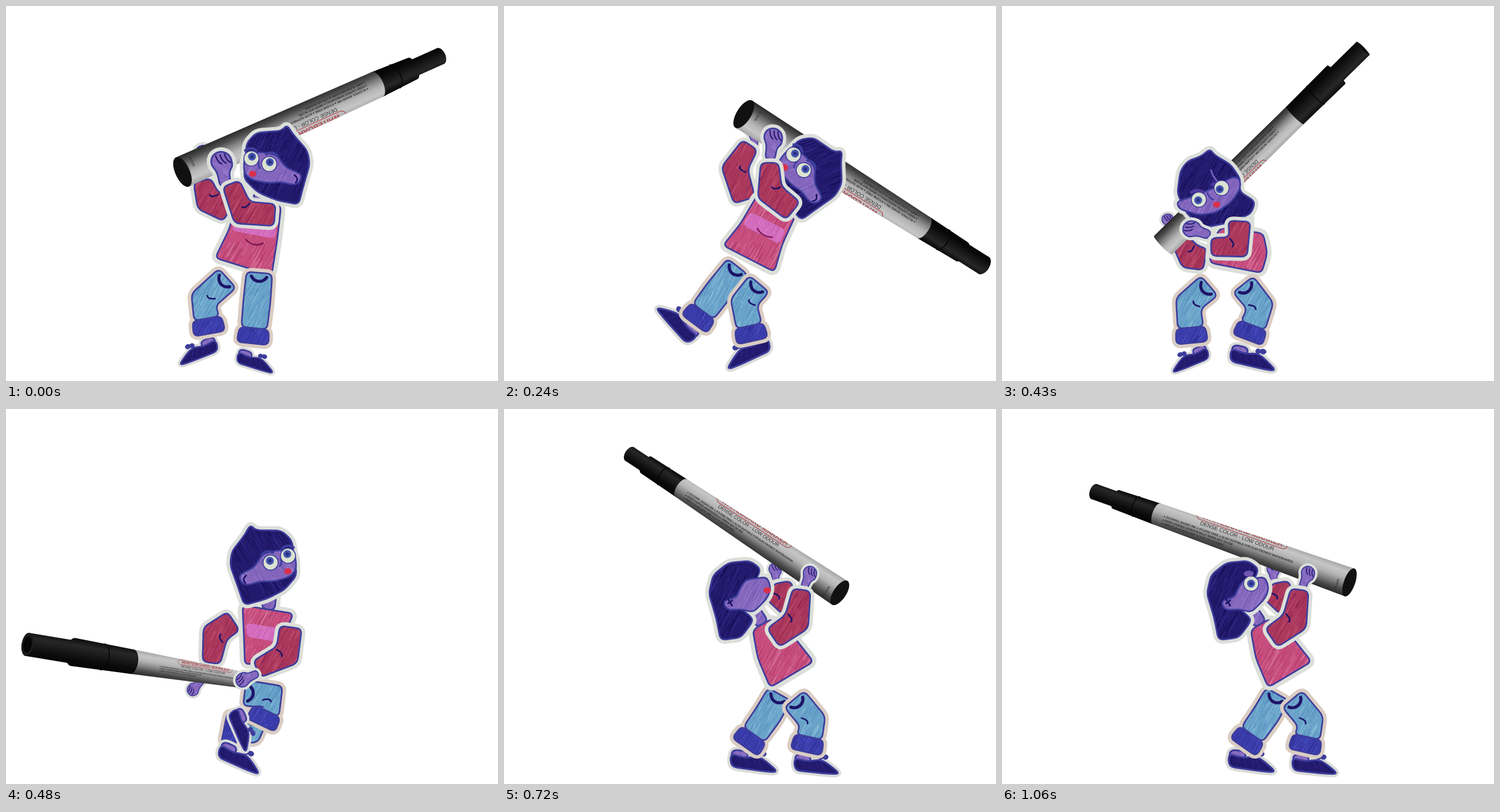
An HTML page with a canvas for the animation above (1.2 s loop, 800 by 610 pixels).

```html
<!DOCTYPE html>
<html lang="en">
<head>
<meta charset="utf-8">
<title>Paper puppet swinging a marker</title>
<style>
html, body { margin: 0; width: 100%; height: 100%; overflow: hidden; background: #fff; }
canvas { display: block; }
</style>
</head>
<body>
<canvas id="stage" width="800" height="610"></canvas>
<script>
const ctx = document.getElementById('stage').getContext('2d');
const WHITE = '#dcdfd9', BEIGE = '#dacdc3', BLUE = '#3d3d9c', NAVY = '#1d1468';

let seed = 7;
const rnd = () => (seed = seed * 16807 % 2147483647) / 2147483647;

// A tile of slanted pencil strokes
function pencil(base, light, dark) {
  const tile = document.createElement('canvas'), size = tile.width = tile.height = 128;
  const c = tile.getContext('2d');
  c.fillStyle = base;
  c.fillRect(0, 0, size, size);
  c.globalAlpha = 0.4;
  c.lineWidth = 1.4;
  for (let i = 0; i < 260; i++) {
    const x = rnd() * size, y = rnd() * size, len = 10 + rnd() * 25;
    c.strokeStyle = rnd() < 0.5 ? light : dark;
    c.beginPath();
    c.moveTo(x, y);
    c.lineTo(x + len * 0.55, y - len);
    c.stroke();
  }
  return ctx.createPattern(tile, 'repeat');
}
const FILL = {
  arm: pencil('#aa385c', '#d0607f', '#8a244e'),
  sweater: pencil('#c74e7f', '#e38fae', '#ac3763'),
  chest: pencil('#d46cbd', '#ec92d8', '#bb5aa8'),
  jeans: pencil('#6aa3ca', '#9accdf', '#4c86b8'),
  cuff: pencil('#3b3cac', '#5962cf', '#29267f'),
  hair: pencil('#221a6c', '#3d3296', '#110a4c'),
  skin: pencil('#8568bd', '#a78adb', '#6c50ad')
};
const nums = s => s.split(' ').map(Number);

// Closed path with softened corners
function outline(n) {
  const p = new Path2D(), pts = [];
  for (let i = 0; i < n.length; i += 2) pts.push([n[i], n[i + 1]]);
  const toward = (a, b) => {
    const d = Math.hypot(b[0] - a[0], b[1] - a[1]), k = Math.min(9, d / 2) / (d || 1);
    return [a[0] + (b[0] - a[0]) * k, a[1] + (b[1] - a[1]) * k];
  };
  pts.forEach((c, i) => {
    p.lineTo(...toward(c, pts.at(i - 1)));
    p.quadraticCurveTo(...c, ...toward(c, pts[(i + 1) % pts.length]));
  });
  p.closePath();
  return p;
}

// Outline of a chain of joints x, y, width
function chain(n) {
  const count = n.length / 3, left = [], right = [];
  for (let i = 0; i < count; i++) {
    const a = 3 * Math.max(0, i - 1), b = 3 * Math.min(count - 1, i + 1);
    const [x, y, w] = n.slice(3 * i);
    const dir = Math.atan2(n[b + 1] - n[a + 1], n[b] - n[a]);
    const nx = -Math.sin(dir) * w / 2, ny = Math.cos(dir) * w / 2;
    left.push(x + nx, y + ny);
    right.unshift(x - nx, y - ny);
  }
  return [...left, ...right];
}

// A paper cut-out: [fill, points] parts on one backing
function card(paper, margin, ...parts) {
  const shapes = parts.map(([fill, n]) => [FILL[fill], outline(n)]);
  ctx.lineJoin = ctx.lineCap = 'round';
  ctx.fillStyle = ctx.strokeStyle = paper;
  ctx.lineWidth = margin * 2;
  for (const [, path] of shapes) { ctx.fill(path); ctx.stroke(path); }
  ctx.strokeStyle = BLUE;
  ctx.lineWidth = 2.6;
  for (const [fill, path] of shapes) {
    ctx.fillStyle = fill;
    ctx.fill(path);
    ctx.stroke(path);
  }
}

function line(points, color = NAVY, width = 2.5) {
  const [x, y, ...rest] = nums(points);
  ctx.beginPath();
  ctx.moveTo(x, y);
  ctx.quadraticCurveTo(...rest);
  ctx.strokeStyle = color;
  ctx.lineWidth = width;
  ctx.stroke();
}

function oval(x, y, rx, ry, fill) {
  ctx.beginPath();
  ctx.ellipse(x, y, rx, ry, 0, 0, 7);
  ctx.fillStyle = fill;
  ctx.fill();
}

function eye(x, y, dx, dy) {
  oval(x, y, 13, 13, BLUE);
  oval(x, y, 11.5, 11.5, '#dce2d0');
  oval(x + dx, y + dy, 6.5, 6.5, '#4356ae');
  oval(x + dx, y + dy, 3, 3, '#2d2f86');
}
const lips = (x, y) => oval(x, y, 6, 5, '#d8304c');

function place(x, y, turn, scale, mirror, draw) {
  ctx.save();
  ctx.translate(x, y);
  ctx.rotate(turn);
  ctx.scale(mirror ? -scale : scale, scale);
  draw();
  ctx.restore();
}

// Crease on the inner side of a bent joint
function crease(ax, ay, jx, jy, bx, by) {
  const dx = (ax + bx) / 2 - jx, dy = (ay + by) / 2 - jy, d = Math.hypot(dx, dy);
  if (d < 10) return;
  const ux = dx / d, uy = dy / d, x = jx + ux * 7, y = jy + uy * 7;
  line([x + uy * 6, y - ux * 6, x, y, x + ux * 12, y + uy * 12].join(' '));
}

function leg(hx, hy, kx, ky, ax, ay) {
  const d = Math.hypot(ax - kx, ay - ky), cx = ax - (ax - kx) / d * 25, cy = ay - (ay - ky) / d * 25;
  card(BEIGE, 7, ['jeans', chain([hx, hy, 42, kx, ky, 44, cx, cy, 42])], ['cuff', chain([cx, cy, 48, ax, ay, 52])]);
  crease(hx, hy, kx, ky, cx, cy);
  const dir = Math.atan2(ky - hy, kx - hx);
  ctx.beginPath();
  ctx.arc(hx, hy, 14, dir - 1.1, dir + 1.1);
  ctx.strokeStyle = NAVY;
  ctx.lineWidth = 5;
  ctx.stroke();
}

function arm(sx, sy, ex, ey, wx, wy, fill = 'arm') {
  card(WHITE, 7, [fill, chain([sx, sy, 36, ex, ey, 43, wx, wy, 29])]);
  crease(sx, sy, ex, ey, wx, wy);
}

// Collar, waist and hem as x, y, width; the neck continues the collar
function torso(joints, striped) {
  const n = nums(joints), [x, y, w, wx, wy, ww] = n;
  const d = Math.hypot(x - wx, y - wy), ux = (x - wx) / d, uy = (y - wy) / d;
  card(WHITE, 8, ['sweater', chain(n)], ['skin', chain([x, y, 22, x + ux * 30, y + uy * 30, 18])]);
  if (!striped) return;
  const at = t => [x + (wx - x) * t, y + (wy - y) * t, w + (ww - w) * t - 8];
  ctx.fillStyle = FILL.chest;
  ctx.fill(outline(chain([...at(0.55), ...at(1)])));
}

function hand(wx, wy, tx, ty) {
  const dx = tx - wx, dy = ty - wy;
  place(wx, wy, Math.atan2(dy, dx), Math.max(0.6, Math.hypot(dx, dy) / 56), false, () => {
    card(WHITE, 7, ['skin', nums('0 -8 25 -9 38 -17 52 -12 56 2 48 15 30 17 22 9 0 9')]);
    for (let y = -7; y < 12; y += 7) line(`50 ${y} 40 ${y + 1} 36 ${y + 7}`, NAVY, 2);
  });
}

function shoe(toeX, toeY, heelX, heelY) {
  const dx = heelX - toeX, dy = heelY - toeY, k = Math.hypot(dx, dy) / 69, flip = dx < 0;
  place(toeX, toeY, Math.atan2(dy, dx) + (flip ? Math.PI : 0), k, flip, () => {
    card('#dadbd8', 5, ['skin', nums('47 -25 70 -25 70 -12 47 -12')],
      ['hair', nums('0 0 18 -13 32 -20 50 -15 72 -19 69 0 20 1')]);
    oval(25, -24, 5, 4, BLUE);
    oval(32, -23, 4, 4, BLUE);
  });
}

// Bob-haired head hung from its hair tip, looking left unless mirrored
function head(x, y, degrees, mirror) {
  place(x, y, degrees * Math.PI / 180, 1, mirror, () => {
    card(WHITE, 7,
      ['hair', nums('-66 28 -50 11 -9 8 0 -2 9 13 33 40 37 62 25 104 19 128 -17 121 -48 108 -70 86')],
      ['skin', nums('-70 52 -47 42 -17 47 -2 68 14 74 24 80 20 93 8 96 -8 91 -30 93 -57 88 -70 77')]);
    line('12 80 20 86 14 92');
    line('-46 57 -48 67 -43 69', BLUE);
    line('-68 40 -58 33 -50 40', BLUE, 4);
    line('-34 46 -24 40 -16 48', BLUE, 4);
    eye(-58, 53, 1, -3);
    eye(-29, 62, 1, -3);
    lips(-56, 78);
  });
}

function frontHead() {
  card(WHITE, 7,
    ['hair', nums('285 305 290 268 302 252 325 244 338 232 345 242 372 258 388 282 386 302 412 318 405 338 370 352 332 360 302 340')],
    ['skin', nums('284 318 304 312 345 296 374 278 386 280 388 296 374 318 348 336 320 340 288 330')]);
  line('340 267 342 278 353 288', '#7a66bd');
  line('334 304 338 314 344 315', BLUE);
  line('308 303 316 297 326 302', '#4e389e', 5);
  line('342 291 351 284 362 289', '#4e389e', 5);
  eye(320, 315, -1, 1);
  eye(357, 296, -3, 2);
  lips(349, 323);
}

function sideHead(awake) {
  card(WHITE, 7,
    ['hair', nums('333 300 340 270 365 250 400 247 418 260 404 290 390 300 386 325 404 340 403 348 385 372 352 376 345 340')],
    ['skin', nums('382 296 392 278 428 273 434 292 428 308 405 331 388 326 362 327 356 312 378 306')]);
  line('364 309 368 315 371 320');
  line('371 311 368 315 364 316');
  if (!awake) return lips(428, 295);
  eye(405, 284, 0, 0);
  oval(401, 268, 8, 5, '#6f55ae');
}

// Marker from tip to butt. tilt > 0 shows the butt face, tilt < 0 the tip face.
// s and j: where the cap steps out and where the barrel begins; off, size: print
function pen({ tip: [x, y], butt: [bx, by], tilt, s, j, r: [rTip, rStep, rJoin, rButt], off = 76, size = 1 }) {
  const L = Math.hypot(bx - x, by - y), k = Math.abs(tilt);
  const shade = (r, colors) => {
    const g = ctx.createLinearGradient(0, -r, 0, r);
    colors.forEach((c, i) => g.addColorStop(i / (colors.length - 1), c));
    return g;
  };
  const tube = (a, ra, b, rb, fill) => {
    const p = new Path2D();
    p.moveTo(a, -ra);
    p.lineTo(b, -rb);
    p.ellipse(b, 0, rb * k, rb, 0, -Math.PI / 2, Math.PI / 2);
    p.lineTo(a, ra);
    p.ellipse(a, 0, ra * k, ra, 0, Math.PI / 2, Math.PI * 1.5);
    ctx.fillStyle = fill;
    ctx.fill(p);
    return p;
  };
  const black = shade(rStep, ['#0b0b0b', '#272727', '#191919', '#0a0a0a', '#050505']);
  const silver = shade(Math.max(rJoin, rButt), ['#a5a5a5', '#c6c6c6', '#b4b4b4', '#858585', '#4c4c4c', '#272727']);
  const end = () => {
    const dome = tilt > 0 ? rTip * 0.6 : 0;
    tube(dome, rTip, s, rTip, black);
    oval(dome, 0, dome, rTip, black);
  };
  const cap = () => {
    tube(s, rStep, j, rJoin, black);
    const r = (rStep + rJoin) / 2;
    ctx.beginPath();
    ctx.ellipse((s + j) / 2, 0, r * k, r, 0, -Math.PI / 2, Math.PI / 2, tilt > 0);
    ctx.strokeStyle = '#050505';
    ctx.lineWidth = 1.5;
    ctx.stroke();
  };
  const print = (font, color, text, tx, ty) => {
    ctx.font = font + ' "Liberation Sans", Arial, sans-serif';
    ctx.fillStyle = color;
    ctx.fillText(text, tx, ty);
  };
  const body = () => {
    const shape = tube(j, rJoin, L, rButt, silver);
    ctx.save();
    ctx.clip(shape);
    ctx.textBaseline = 'middle';
    if (tilt > 0) place(L - rButt * k - 9, 18, -Math.PI / 2, 1, false, () => print('bold 5px', '#333', 'BLACK', 0, 0));
    ctx.translate(j + off, 0);
    ctx.scale(size, size);
    ctx.strokeStyle = '#b04a50';
    ctx.lineWidth = 1.2;
    ctx.beginPath();
    ctx.roundRect(-10, -29, 156, 14, 7);
    ctx.stroke();
    print('bold 12px', '#b04a50', 'WHITEBOARD MARKER', 0, -21.5);
    print('8.8px', '#333', 'DENSE COLOR - LOW ODOUR', 0, -9.5);
    ['ALCOHOL BASED INK ● XYLENE FREE ● ALSO SUITABLE FOR ELECTRONICS WHITEBOARDS',
      'KEEP CAPPED HORIZONTALLY WHEN NOT IN USE',
      'WIPE CLEAN WITH DRY CLOTH OR ERASER'
    ].forEach((text, i) => print('bold 4.8px', '#2b2b2b', '● ' + text, -60, i * 6));
    ctx.restore();
  };
  place(x, y, Math.atan2(by - y, bx - x), 1, false, () => {
    if (tilt > 0) {
      end(); cap(); body();
      tube(L, rButt, L, rButt, '#111');
    } else {
      body(); cap(); end();
      tube(0, rTip, 0, rTip, '#1b1b1b');
      tube(0, rTip * 0.72, 0, rTip * 0.72, '#050505');
    }
  });
}

function lift(awake) {
  hand(442, 285, 440, 250);
  arm(440, 322, 456, 305, 452, 282);
  pen(awake
    ? { tip: [143, 132], butt: [565, 282], tilt: 0.38, s: 45, j: 115, r: [13, 16, 18, 24], off: 72 }
    : { tip: [198, 69], butt: [546, 299], tilt: 0.45, s: 40, j: 108, r: [13, 16, 17, 23], off: 67, size: 0.92 });
  shoe(446, 591, 369, 582);
  shoe(547, 594, 473, 588);
  leg(448, 464, 430, 496, 392, 550);
  leg(472, 472, 502, 508, 491, 558);
  torso('420 350 36 442 388 68 468 432 82');
  sideHead(awake);
  hand(487, 292, 502, 256);
  arm(438, 372, 476, 346, 484, 294);
}

const POSES = [
  () => {
    hand(328, 270, 318, 226);
    arm(362, 334, 328, 316, 319, 284);
    pen({ tip: [714, 78], butt: [287, 270], tilt: 0.45, s: 58, j: 121, r: [14, 19, 22, 26] });
    shoe(281, 585, 345, 561);
    shoe(436, 598, 375, 580);
    leg(360, 443, 321, 478, 331, 533);
    torso('412 318 72 402 372 80 386 424 96', true);
    line('390 380 402 393 418 386', '#7b1a52');
    leg(412, 434, 408, 480, 401, 549);
    head(457, 195, 0, false);
    hand(357, 294, 347, 236);
    arm(437, 340, 384, 336, 366, 289);
  },
  () => {
    hand(408, 228, 406, 212);
    arm(391, 316, 375, 264, 400, 226);
    pen({ tip: [788, 427], butt: [390, 176], tilt: 0.45, s: 51, j: 125, r: [16, 18, 20, 26] });
    shoe(246, 490, 297, 549);
    shoe(362, 592, 434, 560);
    leg(380, 424, 347, 466, 309, 517);
    torso('444 322 70 418 372 76 398 411 94', true);
    line('412 362 420 376 436 376', '#7b1a52');
    leg(415, 452, 390, 482, 404, 545);
    head(549, 237, 39, false);
    hand(432, 250, 440, 198);
    arm(470, 333, 432, 303, 432, 255);
  },
  () => {
    hand(276, 370, 268, 342);
    arm(330, 412, 306, 408, 290, 382);
    pen({ tip: [587, 69], butt: [262, 389], tilt: -0.15, s: 61, j: 155, r: [15, 21, 20, 21], off: 95, size: 0.95 });
    shoe(276, 597, 337, 573);
    shoe(446, 594, 371, 578);
    torso('390 365 70 386 395 92 380 426 86');
    leg(337, 455, 303, 484, 309, 548);
    leg(392, 453, 420, 488, 399, 543);
    frontHead();
    hand(338, 373, 294, 358);
    arm(386, 350, 384, 392, 340, 392);
  },
  () => {
    hand(320, 440, 306, 455);
    arm(370, 345, 340, 365, 334, 413);
    leg(405, 500, 395, 526, 355, 518);
    shoe(413, 595, 344, 566);
    torso('426 326 84 418 375 62 424 410 72', true);
    leg(388, 462, 436, 468, 414, 514);
    shoe(390, 560, 361, 497);
    pen({ tip: [35, 383], butt: [392, 442], tilt: -0.5, s: 75, j: 172, r: [19, 23, 20, 13], off: 80, size: 0.57 });
    arm(463, 355, 457, 400, 408, 423);
    hand(410, 430, 374, 446);
    head(397, 190, -4, true);
  },
  () => {
    hand(554, 352, 572, 306);
    arm(465, 342, 485, 347, 510, 357, 'sweater');
    shoe(414, 596, 350, 560);
    shoe(533, 592, 463, 577);
    leg(430, 464, 426, 520, 382, 535);
    leg(464, 478, 494, 502, 490, 552);
    torso('432 342 60 440 390 62 434 448 48');
    line('428 392 432 402 444 398', '#7b1a52');
    arm(425, 364, 465, 372, 500, 354);
    pen({ tip: [466, 471], butt: [552, 316], tilt: -0.8, s: 44, j: 92, r: [29, 34, 23, 15], off: 28, size: 0.48 });
    head(377, 212, -7, true);
  },
  () => lift(false),
  () => lift(true)
];

let shown = -1;
function tick(now) {
  const t = now % 1200;
  const pose = t < 240 ? 0 : Math.min(6, 1 + Math.floor((t - 240) / 120));
  if (pose !== shown) {
    ctx.clearRect(0, 0, 800, 610);
    POSES[shown = pose]();
  }
  requestAnimationFrame(tick);
}
tick(performance.now());
</script>
</body>
</html>
```
